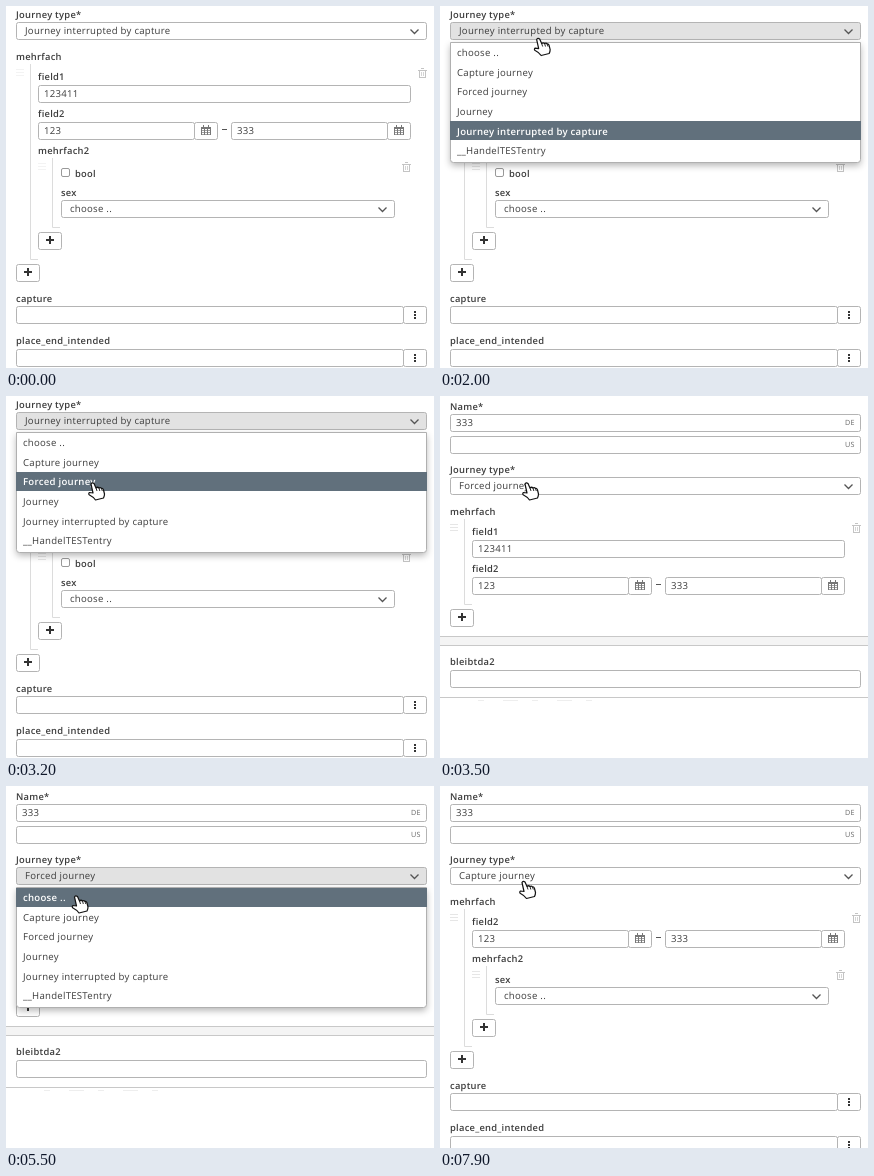
An HTML page with a canvas that plays this animation: 428 by 362 pixels, repeating every 8 s.

```html
<!DOCTYPE html>
<html lang="en">
<head>
<meta charset="utf-8">
<title>Journey form</title>
<style>
html, body { margin: 0; width: 100%; height: 100%; overflow: hidden; background: #fff }
canvas { display: block; width: 428px; height: 362px }
</style>
</head>
<body>
<canvas id="stage"></canvas>
<script>
const W = 428, H = 362, LOOP = 8000, STEP = 100;
const canvas = document.getElementById('stage'), c = canvas.getContext('2d');
const dpr = window.devicePixelRatio || 1;
canvas.width = W * dpr;
canvas.height = H * dpr;

const OPTIONS = ['choose ..', 'Capture journey', 'Forced journey', 'Journey',
  'Journey interrupted by capture', '__HandelTESTentry'];
const ROW = 19.6;
const INK = '#3c3c3c', EDGE = '#b4b4b4';

// Pointer tip: time, x, y
const PATH = [[0, 112, 372], [900, 101.5, 24.5], [1700, 101.5, 24.5], [2600, 92.5, 55.5], [3000, 87.5, 87],
  [3900, 87.5, 87], [4600, 75, 87], [5100, 75, 87], [5500, 71, 110], [5800, 71, 124],
  [7400, 71, 124], [7900, 84.5, 95.5], [8000, 84.5, 95.5]];
const CLICKS = [1500, 3100, 4700, 5900];

const HAND = new Path2D('M-2.5 1Q-1.5-1 .5 .5L2.5 5Q4 3.5 5.5 5Q7 4 8 5.5Q9.5 5 10 7L11 11Q11 13 10 15L2 17Q0 14-4 12Q-5.5 10.5-4 9.5L-.5 10Z');
const KNUCKLES = new Path2D('M2.5 5L3.5 8M5.5 5L6.3 8M8 5.5L8.8 8');
const ARROW = new Path2D('M0 0V13L3 10.3 5.2 15.3 7.3 14.4 5.1 9.5H9.3Z');

const within = (t, a, b) => t >= a && t < b;

function pointerAt(t) {
  const i = PATH.findIndex(p => p[0] > t);
  const [t0, x0, y0] = PATH[i - 1], [t1, x1, y1] = PATH[i];
  const u = (t - t0) / (t1 - t0), e = u * u * (3 - 2 * u);
  return [x0 + (x1 - x0) * e, y0 + (y1 - y0) * e];
}

function text(s, x, cy, { size = 9.6, weight = 400, color = INK } = {}) {
  c.font = `${weight} ${size}px "Open Sans", "Noto Sans", sans-serif`;
  c.letterSpacing = '0.26px';
  c.textRendering = 'geometricPrecision';
  c.fillStyle = color;
  c.fillText(s, x, Math.round(cy + 3.4));
}

const label = (s, x, cy) => text(s, x, cy + .6, { size: 9.35, weight: 600 });

function line(color, width, ...points) {
  c.beginPath();
  points.forEach(([x, y]) => c.lineTo(x, y));
  c.strokeStyle = color;
  c.lineWidth = width;
  c.stroke();
}

function box(x0, x1, cy, fill = '#fff') {
  c.beginPath();
  c.roundRect(x0 + .5, Math.floor(cy - 8) + .5, x1 - x0 - 1, 17, 2);
  c.fillStyle = fill;
  c.fill();
  c.strokeStyle = EDGE;
  c.lineWidth = 1;
  c.stroke();
}

function input(x0, x1, cy, value = '') {
  box(x0, x1, cy);
  text(value, x0 + 6, cy + .5);
}

function select(x0, x1, cy, value, pressed) {
  box(x0, x1, cy - .5, pressed ? '#e2e2e2' : '#fff');
  text(value, x0 + 9, cy - .5);
  const x = x1 - 12.5;
  line('#555', 1.3, [x - 4, cy - 1.5], [x, cy + 2.5], [x + 4, cy - 1.5]);
}

function plusButton(x, cy) {
  box(x, x + 24, cy);
  c.fillStyle = '#333';
  c.fillRect(x + 8, cy - 1, 8, 2);
  c.fillRect(x + 11, cy - 4, 2, 8);
}

function menuInput(cy) {
  box(10, 398, cy);
  box(397, 421, cy);
  c.fillStyle = '#333';
  for (const d of [-4, -1, 2]) c.fillRect(408, cy + 1 + d, 2, 2);
}

function dateInput(x, cy, value) {
  input(x, x + 157, cy, value);
  box(x + 156, x + 180, cy);
  const left = x + 163, top = cy - 3;
  c.fillStyle = '#777';
  c.fillRect(left, top, 10, 8);
  c.fillRect(left + 2, top - 2, 1, 2);
  c.fillRect(left + 7, top - 2, 1, 2);
  c.fillStyle = '#fff';
  for (let i = 0; i < 9; i++) c.fillRect(left + 1 + i % 3 * 3, top + 2 + Math.floor(i / 3) * 2, 2, 1.3);
}

function groupTools(xHandle, xTrash, cy, color) {
  for (const d of [-2.5, .5, 3.5]) line(color, 1, [xHandle, cy + d - 1], [xHandle + 8, cy + d - 1]);
  c.strokeStyle = '#c4c4c4';
  c.strokeRect(xTrash - 2.5, cy - 2.5, 6, 7);
  line('#c4c4c4', 1, [xTrash - 4, cy - 2.5], [xTrash + 5, cy - 2.5]);
  line('#c4c4c4', 1, [xTrash - 1, cy - 4.5], [xTrash + 2, cy - 4.5]);
  for (const d of [-.5, 1.5]) line('#d4d4d4', 1, [xTrash + d, cy - 1], [xTrash + d, cy + 3]);
}

const bracket = (x, y0, y1) =>
  line('#dcdcdc', 1, [x + .5, y0], [x + .5, y1 + .5], [x + 8, y1 + .5]);

function endFields(y) {
  label('capture', 10, y);
  menuInput(y + 16);
  label('place_end_intended', 10, y + 42);
  menuInput(y + 59);
}

function shortEnd() {
  c.fillStyle = '#f4f4f4';
  c.fillRect(0, 240, W, 10);
  for (const y of [240.5, 249.5, 301.5]) line('#c8c8c8', 1, [0, y], [W, y]);
  label('bleibtda2', 10, 265);
  input(10, 421, 282.5);
  c.setLineDash([6, 19, 15, 14]);
  line('#eeeeee', 1, [38, 304.5], [158, 304.5]);
  c.setLineDash([]);
}

function form(kind, value, pressed, handleColor) {
  label('Name*', 10, 10);
  [['333', 'DE', 26.5], ['', 'US', 48]].forEach(([v, lang, y]) => {
    input(10, 421, y, v);
    text(lang, 405, y - .5, { size: 7.2, color: '#666' });
  });
  label('Journey type*', 10, 73);
  select(10, 421, 90, value, pressed);
  label('mehrfach', 10, 115);

  let y = 135;
  if (kind !== 'capture') {
    label('field1', 32, y);
    input(32, 405, y + 17, '123411');
    y += 37;
  }
  label('field2', 32, y);
  dateInput(32, y + 17, '123');
  line('#555', 1, [216, y + 16.5], [221, y + 16.5]);
  dateInput(225, y + 17, '333');
  y += 37;

  let end = 221;
  if (kind !== 'forced') {
    label('mehrfach2', 32, y);
    groupTools(32, 400, y + 17, handleColor);
    let sex = y + 21;
    if (kind === 'interrupted') {
      c.strokeStyle = '#999';
      c.lineWidth = 1;
      c.beginPath();
      c.roundRect(55.5, y + 18.5, 8, 8, 1.5);
      c.stroke();
      label('bool', 69, y + 23);
      sex += 21;
    }
    label('sex', 55, sex);
    select(55, 389, sex + 17, 'choose ..');
    plusButton(32, sex + 48);
    bracket(46, y + 8, sex + 35);
    end = sex + 80;
  }
  groupTools(10, 416, 132, handleColor);
  bracket(24, 123, end - 13);
  plusButton(10, end);
  if (kind === 'forced') shortEnd();
  else endFields(end + 26);
}

function dropdown(top, active) {
  c.save();
  c.beginPath();
  c.roundRect(10.5, top - .5, 410, 120, [0, 0, 3, 3]);
  c.shadowColor = 'rgba(0,0,0,.3)';
  c.shadowBlur = 7 * dpr;
  c.shadowOffsetY = 3 * dpr;
  c.fillStyle = '#fff';
  c.fill();
  c.restore();
  c.strokeStyle = '#b0b0b0';
  c.lineWidth = 1;
  c.stroke();
  OPTIONS.forEach((option, i) => {
    const y = top + i * ROW, on = i === active;
    c.fillStyle = '#61707c';
    if (on) c.fillRect(10, Math.round(y), 411, 19);
    text(option, 17, y + 9.8, on ? { weight: 600, color: '#fff' } : {});
  });
}

function pointer(x, y, hand) {
  c.save();
  c.translate(x, y);
  c.lineJoin = 'round';
  if (hand) {
    c.fillStyle = '#fff';
    c.fill(HAND);
    c.strokeStyle = '#111';
    c.lineWidth = 1.2;
    c.stroke(HAND);
    c.lineWidth = .9;
    c.stroke(KNUCKLES);
  } else {
    c.strokeStyle = '#fff';
    c.lineWidth = 1.6;
    c.stroke(ARROW);
    c.fillStyle = '#111';
    c.fill(ARROW);
  }
  c.restore();
}

function draw(t) {
  const kind = t < 3400 ? 'interrupted' : t < 6200 ? 'forced' : 'capture';
  const selected = t < 3300 ? 4 : t < 6100 ? 2 : 1;
  const scroll = kind === 'interrupted' ? 65 : 0;
  const pressed = within(t, 1500, 3300) || within(t, 4700, 6100);
  const open = within(t, 1800, 3300) || within(t, 5000, 6100);
  const [x, y] = pointerAt(t);
  const listTop = 102 - scroll;
  const hovered = Math.floor((y - listTop) / ROW);
  const overList = open && hovered >= 0 && hovered < OPTIONS.length;
  const overSelect = Math.abs(y - (90 - scroll)) < 9;

  c.setTransform(dpr, 0, 0, dpr, 0, 0);
  c.fillStyle = '#fff';
  c.fillRect(0, 0, W, H);
  c.translate(0, -scroll);
  form(kind, OPTIONS[selected], pressed, t < 100 ? '#f3f3f3' : '#e6e6e6');
  c.translate(0, scroll);
  if (open) dropdown(listTop, overList ? hovered : selected);

  if (CLICKS.some(start => within(t, start, start + 100))) {
    c.beginPath();
    c.arc(x, y, 30.3, 0, 2 * Math.PI);
    c.strokeStyle = '#111';
    c.lineWidth = 1.8;
    c.stroke();
  }
  pointer(x, y, overList || overSelect);
}

const begin = performance.now();
function tick() {
  const t = (performance.now() - begin) % LOOP;
  draw(Math.floor(t / STEP) * STEP);
  requestAnimationFrame(tick);
}
tick();
</script>
</body>
</html>
```
